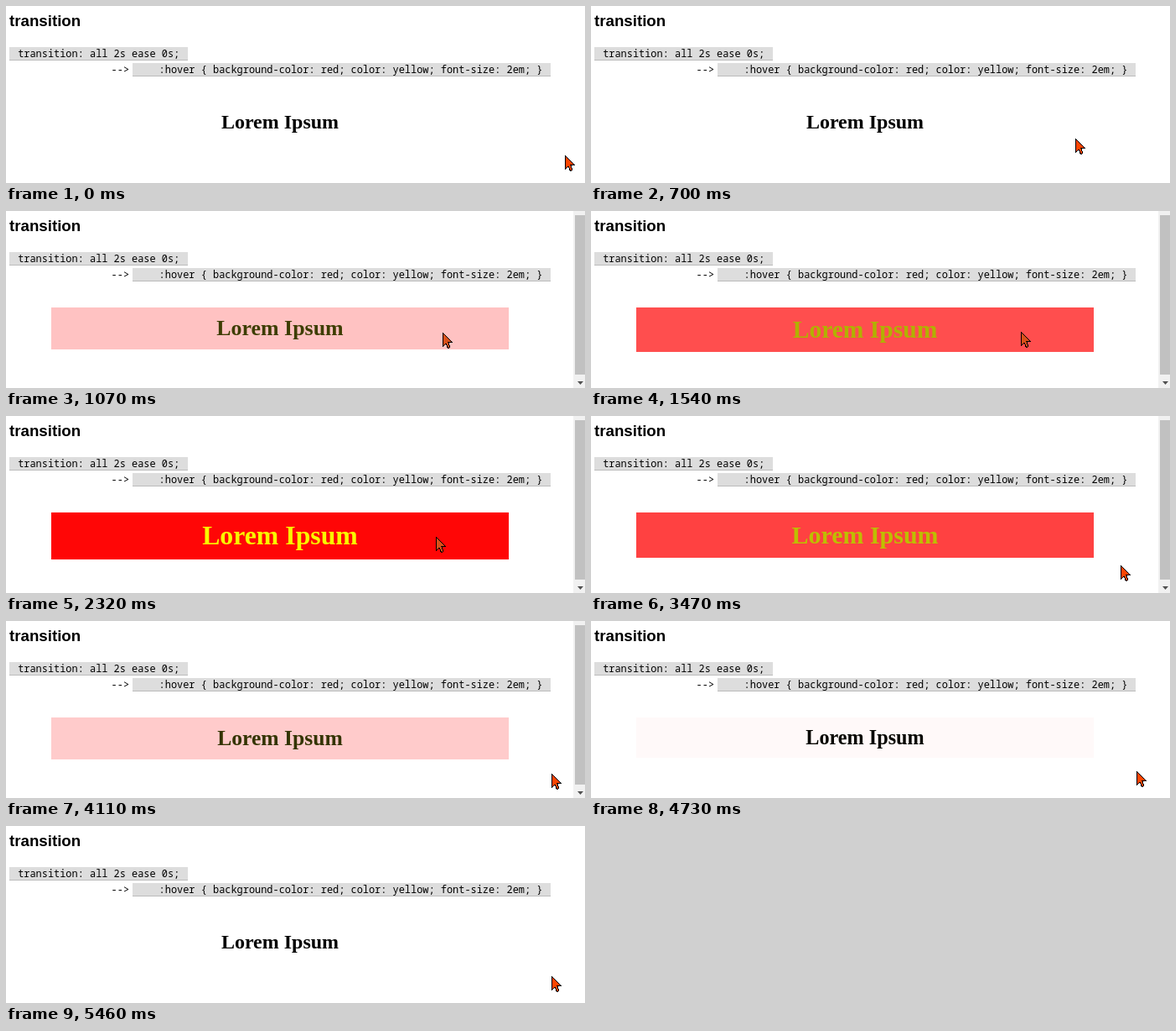
Recreate the animation shown at these times as an HTML page. Size 691 by 211 pixels, loop 5.49 s.

```html
<!DOCTYPE html>
<html lang="en">
<head>
<meta charset="utf-8">
<title>transition</title>
<style>
  html, body { margin: 0; width: 100%; height: 100%; overflow: hidden; background: #fff; }
  #box {
    position: absolute; left: 54px; top: 115px; width: 546px; padding: 10px 0;
    font: bold 24px "Liberation Serif", "Times New Roman", serif;
    text-align: center; white-space: nowrap;
  }
  svg { position: absolute; left: 0; top: 0; }
  .title { font: bold 18.72px "Liberation Sans", Arial, sans-serif; }
  .code { font: 11.93px "Noto Sans Mono", monospace; white-space: pre; }
</style>
</head>
<body>
<div id="box">Lorem Ipsum</div>
<svg width="691" height="211" viewBox="0 0 691 211">
  <text class="title" x="4" y="24">transition</text>
  <g fill="#ddd">
    <rect x="4" y="49" width="213" height="16"/>
    <rect x="151" y="68" width="499" height="16"/>
  </g>
  <path d="M4 64.5H217M151 83.5H650" stroke="#bbb"/>
  <g class="code">
    <text x="14.15" y="61">transition: all 2s ease 0s;</text>
    <text x="125.6" y="80">--&gt;</text>
    <text x="182.6" y="80">:hover { background-color: red; color: yellow; font-size: 2em; }</text>
  </g>
  <g id="bar" visibility="hidden">
    <rect x="677" width="14" height="211" fill="#f1f1f1"/>
    <rect x="679" y="5" width="12" height="190" fill="#c1c1c1"/>
    <path d="M682 203h7l-3.5 4z" fill="#505050"/>
  </g>
  <path id="cursor" d="M.5.5V16.5L4 13L6.5 18.5L8.8 17.5L6.8 11.5H11.5Z"
        stroke="#000" shape-rendering="crispEdges"/>
</svg>
<script>
const LOOP = 5490, TICK = 77.5, PHASE = 18;
const ENTER = 715, LEAVE = 3105, DURATION = 2000;

// Key points of the pointer's path
const PATH = [
  { t: 70, x: 667, y: 178 },
  { t: 1070, x: 521, y: 145 },
  { t: 1300, x: 513, y: 144 },
  { t: 2700, x: 513, y: 144 },
  { t: 3470, x: 632, y: 178 },
  { t: 4080, x: 651, y: 182 },
  { t: 4250, x: 651, y: 179 }
];

const box = document.getElementById("box");
const bar = document.getElementById("bar");
const cursor = document.getElementById("cursor");
const clamp = v => Math.min(1, Math.max(0, v));
const bezier = (s, p, q) => 3 * (1 - s) ** 2 * s * p + 3 * (1 - s) * s * s * q + s ** 3;

// CSS "ease": cubic-bezier(.25, .1, .25, 1)
function ease(x) {
  if (x <= 0) return 0;
  if (x >= 1) return 1;
  let lo = 0, hi = 1;
  for (let i = 0; i < 24; i++) {
    const mid = (lo + hi) / 2;
    if (bezier(mid, .25, .25) < x) lo = mid; else hi = mid;
  }
  return bezier(lo, .1, 1);
}

function pointer(t) {
  const next = PATH.findIndex((p, i) => i > 0 && p.t > t);
  const [a, b] = next < 0 ? PATH.slice(-2) : PATH.slice(next - 1, next + 1);
  const k = clamp((t - a.t) / (b.t - a.t));
  return [a.x + (b.x - a.x) * k, a.y + (b.y - a.y) * k].map(Math.round);
}

function draw(time) {
  const t = Math.max(0, Math.floor((time + PHASE) / TICK) * TICK - PHASE);
  const hover = t >= ENTER && t < LEAVE;
  const k = t < LEAVE ? ease((t - ENTER) / DURATION) : 1 - ease((t - LEAVE) / DURATION);
  const size = 24 + 8 * k;
  const c = Math.round(255 * k);
  box.style.fontSize = size + "px";
  box.style.color = `rgb(${c}, ${c}, 0)`;
  box.style.backgroundColor = `rgba(255, 0, 0, ${k})`;
  bar.setAttribute("visibility", size > 25.25 ? "visible" : "hidden");
  cursor.setAttribute("transform", `translate(${pointer(t)})`);
  cursor.setAttribute("fill", hover ? "#d9501a" : "#ff4500");
}

const start = performance.now();
function loop() {
  draw((performance.now() - start) % LOOP);
  requestAnimationFrame(loop);
}
loop();
</script>
</body>
</html>
```
